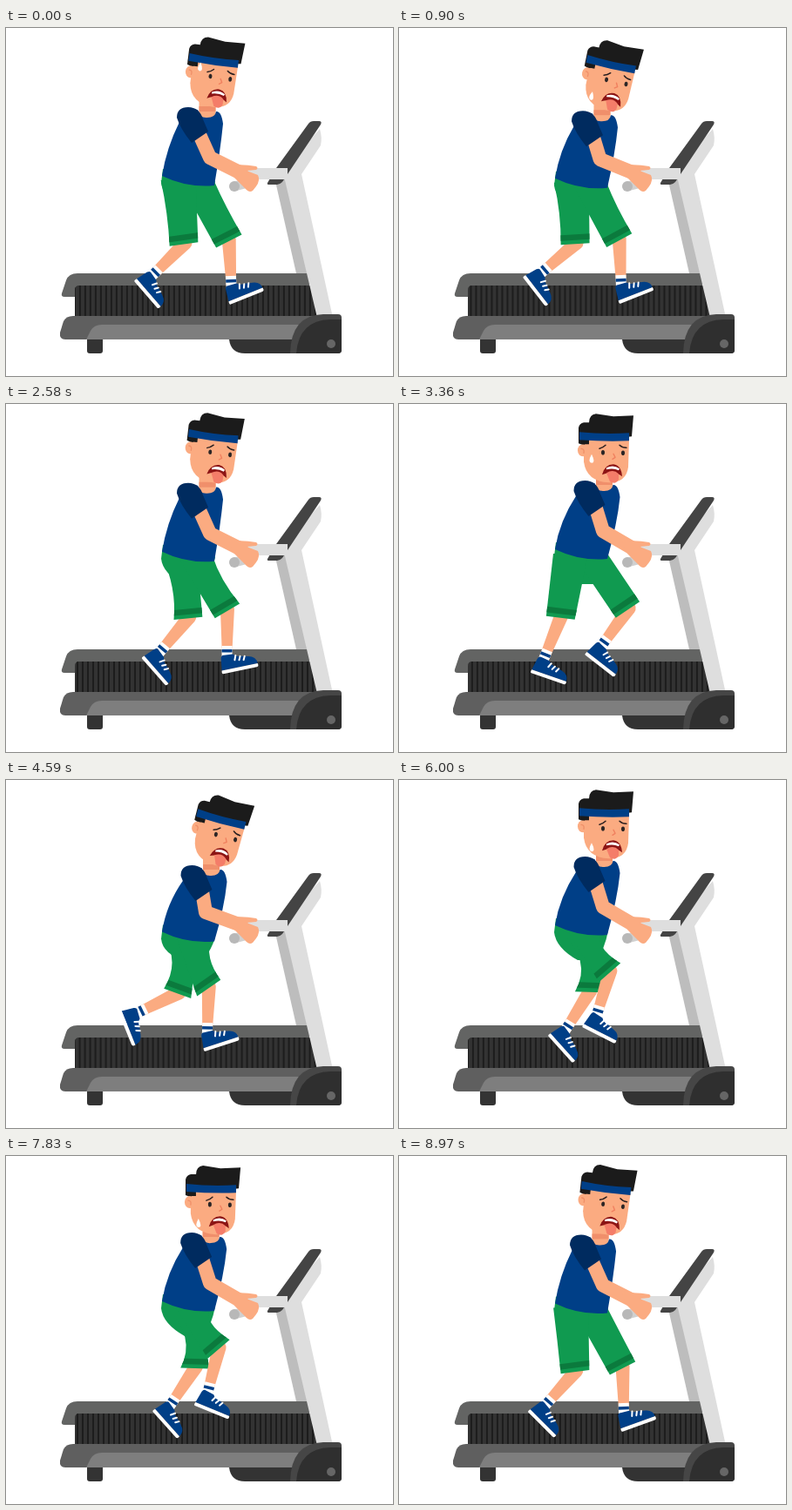
These frames come from a looping animation (444x400 px, 9000 ms). An HTML page with a canvas:

```html
<!DOCTYPE html>
<html lang="en">
<head>
<meta charset="utf-8">
<title>Tired runner on a treadmill</title>
<style>
html, body { margin: 0; width: 100%; height: 100%; overflow: hidden; background: #fff; }
canvas { display: block; width: 444px; height: 400px; }
</style>
</head>
<body>
<canvas id="stage" width="444" height="400"></canvas>
<script>
const ctx = document.getElementById('stage').getContext('2d');
const LOOP = 9000, GAIT = 1800, SHIN = 53;
const SKIN = '#fbab81', BLUE = '#003f87', NAVY = '#002b5f', GREEN = '#109a50', DEEP = '#0b7a3d';

// Leg poses: shin angle, hem angle, heel x, heel y, foot angle
const strike = [-3, -27, 257, 318, -22];
const push = [45, -8, 147, 291, 49];
const lift = [64, 20, 129, 267, 68];
const land = [2, -35, 228, 312, -18];
const trail = [32, 2, 171, 294, 48];
const raise = [17, -41, 210, 284, 27];
const swing = [36, -34, 213, 288, 38];
const stance = [22, 7, 151, 309, 19];

const key = (time, far, near, lean) => ({ time, values: [...far, ...near, lean] });
const walk = [
  key(0, strike, push, 0),
  key(120, land, lift, 0.3),
  key(600, trail, raise, -1),
  key(870, push, strike, 0.5),
  key(990, lift, land, 1),
  key(1560, swing, stance, -1)
];

// Smooth periodic interpolation that never overshoots its keys
function sample(keys, t) {
  const n = keys.length;
  const at = (i, k) => keys[(i + n) % n].values[k];
  const time = i => keys[(i + n) % n].time + Math.floor(i / n) * GAIT;
  let i = n - 1;
  while (time(i) > t) i--;
  const span = time(i + 1) - time(i), u = (t - time(i)) / span, v = 1 - u;
  return keys[i].values.map((a, k) => {
    const slope = j => (at(j + 1, k) - at(j, k)) / (time(j + 1) - time(j));
    const tangent = j => {
      const p = slope(j - 1), q = slope(j);
      return p * q <= 0 ? 0 : 2 * p * q / (p + q);
    };
    return a * (1 + 2 * u) * v * v + at(i + 1, k) * u * u * (3 - 2 * u)
      + span * (tangent(i) * u * v * v - tangent(i + 1) * u * u * v);
  });
}

const rad = d => d * Math.PI / 180;
const clamp = (x, lo, hi) => Math.max(lo, Math.min(hi, x));

function fill(d, color) {
  ctx.fillStyle = color;
  ctx.fill(new Path2D(d));
}

function line(d, color, width, cap = 'round') {
  ctx.strokeStyle = color;
  ctx.lineWidth = width;
  ctx.lineCap = cap;
  ctx.lineJoin = 'round';
  ctx.stroke(new Path2D(d));
}

function dot(x, y, rx, ry, color) {
  ctx.fillStyle = color;
  ctx.beginPath();
  ctx.ellipse(x, y, rx, ry, 0, 0, 7);
  ctx.fill();
}

function place(x, y, deg, paint) {
  ctx.save();
  ctx.translate(x, y);
  ctx.rotate(rad(deg));
  paint();
  ctx.restore();
}

function deck(t) {
  fill('M64 305L69 290Q72 282 82 282H348V309H67Q63 309 64 305Z', '#636463');
  ctx.save();
  ctx.clip(new Path2D('M79 331V301Q79 296 84 296H357V331Z'));
  ctx.fillStyle = '#333';
  ctx.fillRect(79, 296, 278, 35);
  ctx.fillStyle = '#1d1d1d';
  const shift = (t * 0.136) % 6;
  for (let x = 78 - shift; x < 360; x += 6) ctx.fillRect(x, 296, 2, 35);
  ctx.restore();
  fill('M93 355H111V371Q111 374 108 374H96Q93 374 93 371Z', '#333');
  fill('M62 350L66 337Q69 331 77 331H360V358H68Q61 358 62 350Z', '#5f5f5f');
  fill('M92 358L97 348Q101 341 110 341H345V358Z', '#7e7e7e');
}

function frame() {
  fill('M309 176L333 282H346L325 172Z', '#bdbdbd');
  fill('M360 116Q363 126 361 135L339 168L375 333H357L320 175V160Z', '#dedede');
  fill('M256 358H340V374H274Q258 374 256 358Z', '#333');
  fill('M326 374Q327 330 364 329H381Q385 329 385 333V370Q385 374 381 374Z', '#464646');
  fill('M333 374Q336 336 372 335H385V370Q385 374 381 374Z', '#2f2f2f');
  dot(373, 363, 5, 5, '#666');
  fill('M300 178L310 161L347 110Q349 107 353 107H359Q363 107 361 111L317 177Q314 180 311 180H302Q299 180 300 178Z', '#444');
  fill('M274 161H323V174H280Q272 170 274 161Z', '#dedede');
  line('M262 182L274 179', '#d0d0d0', 11);
  dot(262, 182, 6, 6, '#b8b8b8');
}

function shoe() {
  fill('M0 -4L2 -18Q3 -22 6 -21L16 -20Q19 -16 25 -16L33 -14Q42 -12 42 -4Z', BLUE);
  fill('M0 -4H42Q43 0 40 0H1Q-1 0 0 -4Z', '#fff');
  line('M17 -13L19 -18M22 -12L24 -16M27 -11L29 -15', '#fff', 2);
}

// Adds the ankle and hem positions that follow from the shin angle
function joints([shin, hem, x, y, foot]) {
  const c = Math.cos(rad(foot)), s = Math.sin(rad(foot));
  const ax = x + 9 * c + 18 * s, ay = y + 9 * s - 18 * c;
  return {
    shin, hem, x, y, foot,
    hx: ax + SHIN * Math.sin(rad(shin)),
    hy: ay - SHIN * Math.cos(rad(shin))
  };
}

function leg({ shin, hem, x, y, foot, hx, hy }, other, waist) {
  place(hx, hy, shin + 90, () => {
    const len = SHIN + 1;
    fill(`M-2 -8A8 8 0 0 0 -2 8L${len} 5.5V-5.5Z`, SKIN);
    ctx.fillStyle = '#fff';
    ctx.fillRect(len - 14, -6, 15, 12);
    ctx.fillStyle = BLUE;
    ctx.fillRect(len - 10, -6, 3.5, 12);
  });
  place(x, y, foot, shoe);

  // The outer edge folds in at the knee while the legs pass each other
  const gap = (hx - other.hx) * 0.2, spread = clamp(gap, -11, 11);
  const fold = Math.min(30, (11 - Math.abs(spread)) * 5);
  const side = clamp(0.5 + gap / 9, 0, 1);
  const left = 188 + spread, right = 228 + spread, top = 175 + waist;
  const ux = 16.5 * Math.cos(rad(hem)), uy = 16.5 * Math.sin(rad(hem));
  const lx = hx - ux, ly = hy - uy, rx = hx + ux, ry = hy + uy;
  const shape = new Path2D(`M${left} ${top}H${right}`
    + `Q${(right + rx) / 2 - fold * side * 0.7} ${(top + ry) / 2} ${rx} ${ry}L${lx} ${ly}`
    + `Q${(left + lx) / 2 + fold * (1 - side)} ${(top + ly) / 2} ${left} ${top}Z`);
  ctx.fillStyle = GREEN;
  ctx.fill(shape);
  ctx.save();
  ctx.clip(shape);
  place(hx, hy, hem, () => {
    ctx.fillStyle = DEEP;
    ctx.fillRect(-26, -11, 52, 6.5);
  });
  ctx.restore();
}

function torso(sx, sy, w) {
  const p = (x, y) => `${x + sx} ${y + sy} `;
  line(`M${p(231, 84)}V${106 + sy}`, SKIN, 19, 'butt');
  line(`M${p(231, 90)}V${96 + sy}`, '#f08f6b', 19, 'butt');
  fill(`M${p(204, 92)}L${p(220, 94)}Q${p(222, 104)}${p(231, 103)}Q${p(240, 103)}${p(241, 96)}`
    + `Q${p(247, 95)}${p(249, 110)}Q${p(246, 140)}239 ${181 + w}`
    + `Q208 ${184 + w} 179 ${170 + w}Q184 ${138 + w} ${p(199, 108)}Z`, BLUE);
}

function arm(sx, sy, ex, ey) {
  const p = (x, y) => `${x + sx} ${y + sy} `;
  line(`M${p(220, 118)}L${ex} ${ey}L270 167`, SKIN, 16);
  fill('M256 158Q272 156 287 159Q290 161 287 163L276 164L289 169Q292 175 287 182'
    + 'L283 187Q279 190 274 184L262 172Z', SKIN);
  fill(`M${p(196, 103)}Q${p(196, 91)}${p(209, 91)}Q${p(222, 91)}${p(226, 105)}`
    + `L${p(232, 119)}L${p(213, 132)}Q${p(200, 116)}${p(196, 103)}Z`, NAVY);
}

function drop(t) {
  const starts = [0, 1400, 2880, 5100, 6930];
  const age = t - starts.findLast(s => s <= t);
  if (age > 1000) return;
  const y = 46 + 31 * Math.min(1, age / 900);
  fill(`M221 ${y - 5}Q226 ${y + 5} 221 ${y + 5}Q216 ${y + 4} 221 ${y - 5}Z`, '#fff');
}

function head(t) {
  const shut = Math.abs(t % 4500 - 1800) < 80;
  fill('M206 45V27Q207 22 212 21H218Q218 12 226 11L246 14L269 13L267 37L220 43L214 48Z', '#1b1b1b');
  dot(211, 53, 6, 7, SKIN);
  fill('M212 48L217 40H264L263 72Q261 90 241 90Q215 89 212 66Z', SKIN);
  line('M209 51Q213 51 212 56', '#ef8f68', 1.3);
  fill('M206 40H218V46L210 46Z', '#1b1b1b');
  fill('M207 32Q236 35 264 33V42Q236 43 207 41Z', BLUE);
  if (!shut) {
    dot(234, 55.5, 2, 2.8, '#2b2525');
    dot(257, 56, 2, 2.8, '#2b2525');
    line('M230 51Q234 50 237 47M253 47Q256 50 261 50', '#2b2020', 1.5);
  }
  line('M246 57L248 61L245 63', '#f0805f', 1.4);
  fill('M233 81Q236 69 246 69Q255 70 256 83Q246 75 233 81Z', '#8c1515');
  fill('M238 73Q246 69 253 74L252 76Q246 73 238 75Z', '#fff');
  fill('M238 79Q246 74 252 80L252 86Q249 93 242 89Z', '#f47d69');
  drop(t);
}

function draw(t) {
  ctx.fillStyle = '#fff';
  ctx.fillRect(0, 0, 444, 400);
  const pose = sample(walk, t % GAIT);
  const far = joints(pose.slice(0, 5)), near = joints(pose.slice(5, 10));

  // One lean value, from -1 upright to 1 slumped, drives the upper body
  const u = pose[10], uu = u * u;
  const waist = 0.7 * uu + 3.8 * u;
  const sx = 4.5 * uu, sy = 2 * uu + 5 * u;

  deck(t);
  frame();
  fill(`M180 ${162 + waist}L178 ${178 + waist}Q180 ${196 + waist} 205 207H226`
    + `Q236 195 240 ${176 + waist}Z`, GREEN);
  leg(far, near, waist);
  leg(near, far, waist);
  torso(sx, sy, waist);
  arm(sx, sy, 234 - 5 * Math.max(u, 0), 149 + 3 * u);
  place(232 + 3 * uu - u, 92 + 3.4 * uu + 3.1 * u, 7 + 7 * u, () => {
    ctx.translate(-236, -92);
    head(t);
  });
}

const start = performance.now();
function tick() {
  draw((performance.now() - start) % LOOP);
  requestAnimationFrame(tick);
}
tick();
</script>
</body>
</html>
```
